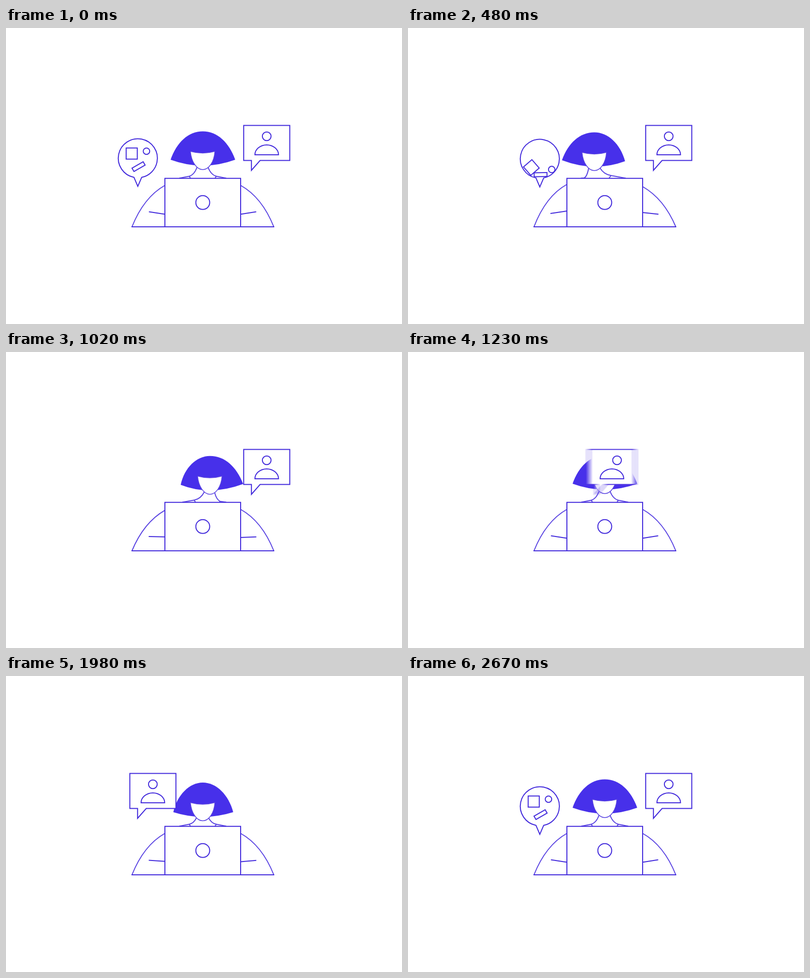
These frames come from a looping animation (800 px wide and 600 px high, 2700 ms). An HTML page with a canvas:

```html
<!DOCTYPE html>
<html lang="en">
<head>
<meta charset="utf-8">
<title>Woman at a laptop</title>
<style>
  html, body { margin: 0; width: 100%; height: 100%; overflow: hidden; background: #fff; }
  canvas { display: block; }
</style>
</head>
<body>
<canvas id="stage" width="800" height="600"></canvas>
<script>
const LOOP = 2700, STEP = 30;
const LINE = '#432bdc', HAIR = '#4730ea', SOFT = '#5a44e2';
const stage = document.getElementById('stage').getContext('2d');
const layer = document.createElement('canvas');
layer.width = 800;
layer.height = 600;
const blurred = layer.getContext('2d');

const mix = (a, b, u) => a + (b - a) * u;
const smooth = u => (1 - Math.cos(Math.PI * u)) / 2;

// Eased value at time t on a list of [time, value] keys
function track(t, keys) {
  if (t <= keys[0][0]) return keys[0][1];
  for (let i = 1; i < keys.length; i++) {
    const [t0, a] = keys[i - 1], [t1, b] = keys[i];
    if (t < t1) return mix(a, b, smooth((t - t0) / (t1 - t0)));
  }
  return keys[keys.length - 1][1];
}

function bounce(u) {
  if (u <= 0) return 0;
  if (u >= 1) return 1;
  if (u < 0.65) return (u / 0.65) ** 2;
  const v = (u - 0.825) / 0.175;
  return 1 - 0.1 * (1 - v * v);
}

function paint(c, path, { fill = '#fff', line = LINE, width = 2 } = {}) {
  c.beginPath();
  path(c);
  if (fill) { c.fillStyle = fill; c.fill(); }
  if (line) { c.strokeStyle = line; c.lineWidth = width; c.stroke(); }
}
const circle = (c, x, y, r) => paint(c, p => p.arc(x, y, r, 0, 7));
const segment = (c, x0, y0, x1, y1, line = LINE) =>
  paint(c, p => { p.moveTo(x0, y0); p.lineTo(x1, y1); }, { fill: null, line });

function box(c, x, y, w, h, degrees) {
  c.save();
  c.translate(x, y);
  c.rotate(degrees * Math.PI / 180);
  paint(c, p => p.rect(-w / 2, -h / 2, w, h));
  c.restore();
}

// Head, hair tips, neck and shoulder positions in each pose
const rest = {
  x: 397.5, y: 0, top: 209.5, hairL: [332.5, 267], hairR: [463, 267],
  neckL: [386, 282], neckR: [408, 282], collarL: [370, 300.5], collarR: [425, 300.5],
  innerL: 350, innerR: 445, outerL: 319, outerR: 319
};
const left = {
  x: 376.5, y: 2, top: 211.5, hairL: [311, 268], hairR: [438.5, 270],
  neckL: [365, 284], neckR: [388, 284], collarL: [356, 304], collarR: [410, 299],
  innerL: 349, innerR: 440, outerL: 317, outerR: 321.5
};
const right = {
  x: 428, y: 3, top: 212, hairL: [375.5, 271.5], hairR: [497, 268],
  neckL: [417, 285], neckR: [436, 287], collarL: [391, 300], collarR: [441, 305],
  innerL: 363, innerR: 445, outerL: 323, outerR: 319
};
const nod = {
  ...rest, y: 6.5, top: 216, hairL: [338, 276], hairR: [459, 276],
  neckL: [384.5, 288], neckR: [409.5, 288]
};

function poseAt(t) {
  const weights = [
    [left, track(t, [[100, 0], [450, 1], [510, 1], [700, 0]])],
    [right, track(t, [[540, 0], [780, 1], [860, 1], [1170, 0]])],
    [nod, track(t, [[1680, 0], [1950, 1], [2010, 1], [2280, 0]])]
  ];
  const blend = pick => weights.reduce(
    (sum, [pose, w]) => sum + w * (pick(pose) - pick(rest)), pick(rest));
  const pose = {};
  for (const key in rest) {
    pose[key] = Array.isArray(rest[key])
      ? [blend(p => p[key][0]), blend(p => p[key][1])]
      : blend(p => p[key]);
  }
  return pose;
}

function drawHair(c, { x, top, y, hairL: [lx, ly], hairR: [rx, ry] }) {
  const wl = x - lx, wr = rx - x;
  paint(c, p => {
    p.moveTo(lx, ly);
    p.bezierCurveTo(lx + (wl - 50) * 0.8, ly - 35, x - wl * 0.45, top, x, top);
    p.bezierCurveTo(x + wr * 0.45, top, rx - (wr - 50) * 0.8, ry - 35, rx, ry);
    p.quadraticCurveTo(x, 558 + 2 * y - (ly + ry) / 2, lx, ly);
  }, { fill: HAIR, line: null });
}

function drawFace(c, { x, y }) {
  paint(c, p => {
    p.moveTo(x - 25, 250 + y);
    p.quadraticCurveTo(x, 257 + y, x + 24.5, 250 + y);
    p.bezierCurveTo(x + 23, 272 + y, x + 12, 287 + y, x, 287 + y);
    p.bezierCurveTo(x - 12, 287 + y, x - 23, 272 + y, x - 25, 250 + y);
  }, { line: SOFT, width: 1.5 });
}

function drawNeck(c, [nx, ny], [cx, cy], inner, side) {
  const dx = cx - nx, dy = cy - ny;
  paint(c, p => {
    p.moveTo(nx, ny);
    p.bezierCurveTo(nx + dx * 0.25, ny + dy * 0.6, cx - dx * 0.35, cy - dy * 0.08, cx, cy);
    p.lineTo(inner, 304.5);
  }, { fill: null, line: SOFT });
  segment(c, cx, cy, cx - side * 3.5, cy + 5, SOFT);
}

function drawShoulder(c, foot, edge, y, side) {
  paint(c, p => {
    p.moveTo(foot, 403);
    p.quadraticCurveTo(foot - side * 24, 343 + (y - 319) * 1.2, edge, y);
  }, { fill: null, line: SOFT });
}

function drawWoman(c, t) {
  const pose = poseAt(t);
  drawHair(c, pose);
  drawNeck(c, pose.neckL, pose.collarL, pose.innerL, -1);
  drawNeck(c, pose.neckR, pose.collarR, pose.innerR, 1);
  drawFace(c, pose);
  drawShoulder(c, 254.5, 321, pose.outerL, -1);
  drawShoulder(c, 541, 474, pose.outerR, 1);
  segment(c, 253.5, 403, 542, 403);

  const arm = track(t, [[60, 0], [360, 1], [840, 1], [1170, 0], [1650, 0],
    [1800, -0.5], [1980, 0.27], [2160, 0]]);
  segment(c, 288.7 - arm, 372.5 + 3.5 * arm, 321, 377.5 - 6.5 * arm);
  segment(c, 474, 377.5 - 3.5 * arm, 505.5 + arm / 2, 372.5 + 5 * arm);

  paint(c, p => p.rect(321, 304.7, 153, 98.3));
  circle(c, 397.5, 353.8, 14);
}

function drawRoundBubble(c, t) {
  const alpha = track(t, [[810, 1], [960, 0], [2190, 0], [2340, 1]]);
  if (alpha <= 0) return;
  const arriving = t > 1500;
  const rise = 1 - Math.min(1, Math.max(0, (t - 2190) / 450));
  const y = arriving
    ? 60 * rise * rise
    : track(t, [[390, 0], [520, 1.5], [600, 0], [840, -61]]);
  const fall = arriving ? 0 : bounce((t - 60) / 390);
  const roll = arriving ? 0 : track(t, [[510, 0], [750, 1]]);

  c.save();
  c.globalAlpha = alpha;
  c.translate(0, y);
  paint(c, p => {
    p.arc(266.3, 264, 39.5, Math.PI / 2 + 0.2, Math.PI / 2 - 0.2 + 2 * Math.PI);
    p.lineTo(266.3, 321);
    p.closePath();
  });
  box(c, mix(254, 249.2, fall), mix(254.5, 281.6, fall), 22.5, 22.5, -41 * fall - 4 * roll);
  circle(c, mix(283.8, 290.3, fall) + roll, mix(249.7, 285.6, fall), 6.5);
  box(c, 267.8, mix(281, 296, fall), 26, 8, mix(-30, -1, fall));
  c.restore();
}

const slide = t => track(t, [[1020, 0], [1080, 2], [1420, -284], [1760, -230],
  [2170, -230], [2620, 0]]);

function drawSquareBubble(c, t) {
  const samples = 16, shutter = 11;
  blurred.clearRect(0, 0, 800, 600);
  const moving = Math.abs(slide(t + 6) - slide(t - 6)) > 0.2;
  const count = moving ? samples : 1;
  blurred.globalCompositeOperation = 'lighter';
  for (let i = 0; i < count; i++) {
    const x = slide(t + shutter * ((i + 0.5) / count - 0.5));
    // Fill and line overlap, so each sample is one opaque silhouette plus its outline
    const outline = p => {
      p.moveTo(480.2 + x, 197.5);
      p.lineTo(573.3 + x, 197.5);
      p.lineTo(573.3 + x, 268.6);
      p.lineTo(513.3 + x, 268.6);
      p.lineTo(495.8 + x, 288.5);
      p.lineTo(495.8 + x, 268.6);
      p.lineTo(480.2 + x, 268.6);
      p.closePath();
    };
    sample.clearRect(0, 0, 800, 600);
    paint(sample, outline);
    blurred.globalAlpha = 1 / count;
    blurred.drawImage(sample.canvas, 0, 0);
  }
  c.drawImage(layer, 0, 0);

  const x = slide(t), headX = slide(t - (t < 2000 ? 8 : 17));
  circle(c, 526.7 + headX, 219.5, 8.8);
  paint(c, p => {
    p.ellipse(526.7 + x, 257, 23.8, 20, 0, Math.PI, 2 * Math.PI);
    p.closePath();
  });
}
const sample = document.createElement('canvas').getContext('2d');
sample.canvas.width = 800;
sample.canvas.height = 600;

function draw(t) {
  stage.fillStyle = '#fff';
  stage.fillRect(0, 0, 800, 600);
  drawRoundBubble(stage, t);
  drawWoman(stage, t);
  drawSquareBubble(stage, t);
}

const start = performance.now();
function tick() {
  const elapsed = (performance.now() - start) % LOOP;
  draw(Math.floor(elapsed / STEP) * STEP);
  requestAnimationFrame(tick);
}
tick();
</script>
</body>
</html>
```
